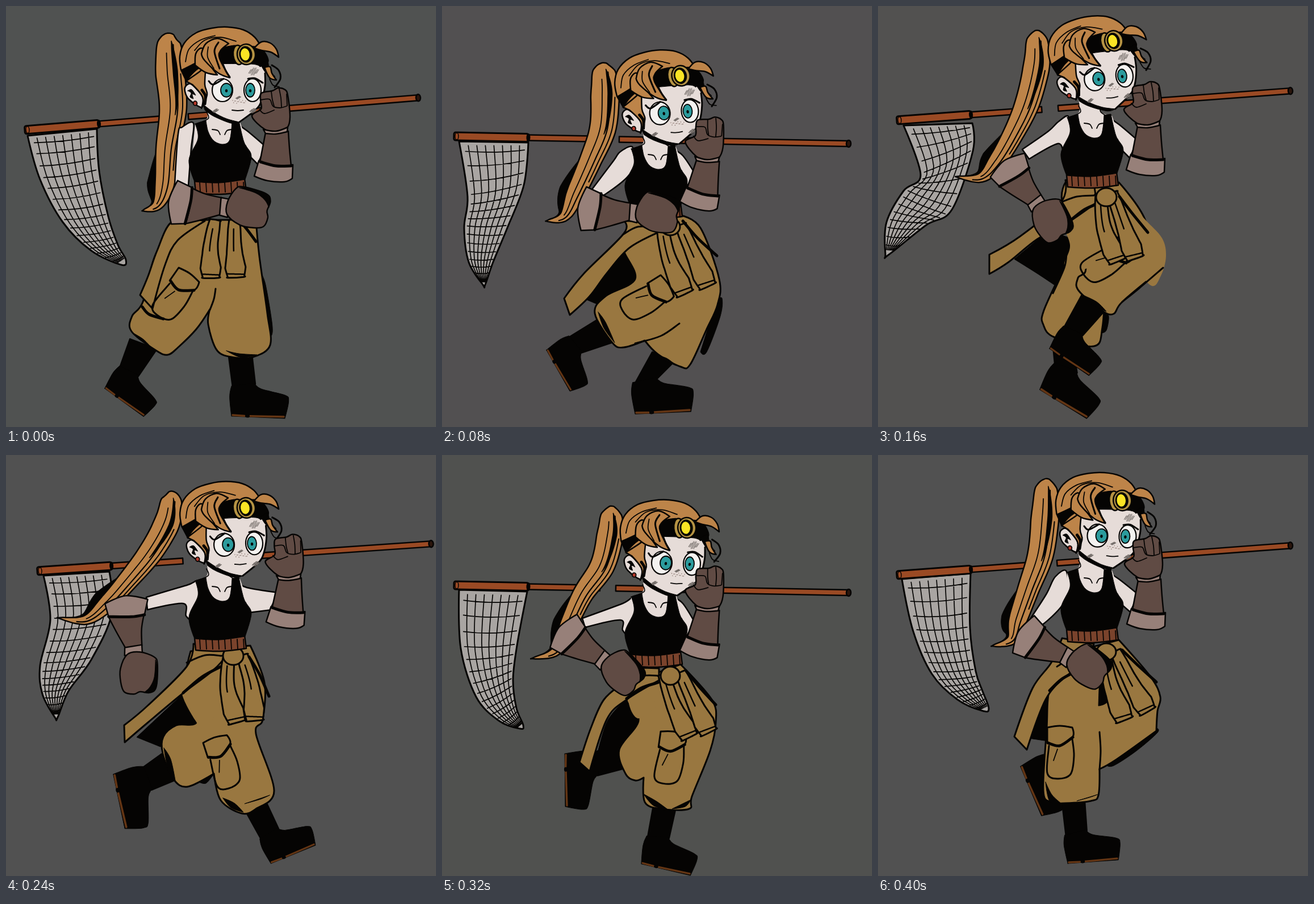
Animation of 757x740 px, one loop 0.48 s. Source, as an HTML page with a canvas:

```html
<!DOCTYPE html>
<html lang="en">
<head>
<meta charset="utf-8">
<title>Walk cycle</title>
<style>
html, body { margin: 0; width: 100%; height: 100%; overflow: hidden; background: #515151; }
canvas { display: block; }
</style>
</head>
<body>
<canvas id="stage" width="757" height="740"></canvas>
<script>
const ctx = document.getElementById('stage').getContext('2d');
const STEP = 80, INK = '#050403', KHAKI = '#997740', HAIR = '#bd8449', SKIN = '#e6dcd8';
const GLOVE = '#604b44', CUFF = '#978079', RUST = '#9a4a24', BELT = '#7a432c', GOLD = '#b59343';
const rad = deg => deg * Math.PI / 180;

// "x y x y! ..." where ! marks a sharp corner
function points(text) {
  const n = text.trim().split(/\s+/), out = [];
  for (let i = 0; i < n.length; i += 2)
    out.push({ x: parseFloat(n[i]), y: parseFloat(n[i + 1]), hard: n[i + 1].endsWith('!') });
  return out;
}

function trace(p, closed) {
  const n = p.length;
  const get = i => closed ? p[(i + n) % n] : p[Math.max(0, Math.min(n - 1, i))];
  ctx.beginPath();
  ctx.moveTo(p[0].x, p[0].y);
  for (let i = 0; i < (closed ? n : n - 1); i++) {
    const a = get(i - 1), b = get(i), c = get(i + 1), d = get(i + 2);
    const k = b.hard ? 0 : 1 / 6, m = c.hard ? 0 : 1 / 6;
    ctx.bezierCurveTo(b.x + (c.x - a.x) * k, b.y + (c.y - a.y) * k,
      c.x - (d.x - b.x) * m, c.y - (d.y - b.y) * m, c.x, c.y);
  }
  if (closed) ctx.closePath();
}

function paint(fill, width) {
  if (fill) { ctx.fillStyle = fill; ctx.fill(); }
  if (width) { ctx.strokeStyle = INK; ctx.lineWidth = width; ctx.stroke(); }
}

const pen = (fill, width) => text => { trace(points(text), !!fill); paint(fill, width); };
const cloth = pen(KHAKI, 3), patch = pen(KHAKI, 0), ink = pen(INK, 1), hair = pen(HAIR, 2.5);
const skin = pen(SKIN, 2.5), bare = pen(SKIN, 0), glove = pen(GLOVE, 2.5), cuff = pen(CUFF, 2.5);
const belt = pen(BELT, 2.5), thin = pen(null, 1.8), line = pen(null, 3), thick = pen(null, 5);

function oval(x, y, rx, ry, fill, width, turn = 0) {
  ctx.beginPath();
  ctx.ellipse(x, y, rx, ry, turn, 0, 7);
  paint(fill, width);
}

function placed(fn, x, y, deg, scale = 1, px = 0, py = 0) {
  ctx.save();
  ctx.translate(x + px, y + py);
  ctx.rotate(rad(deg));
  ctx.scale(scale, scale);
  ctx.translate(-px, -py);
  fn();
  ctx.restore();
}

// smooth position at share u of a point list
function along(p, u) {
  const f = Math.max(0, Math.min(u, .9999)) * (p.length - 1), i = Math.floor(f), t = f - i;
  const q = k => p[Math.max(0, Math.min(p.length - 1, i + k))];
  const mix = k => {
    const a = q(-1)[k], b = q(0)[k], c = q(1)[k], d = q(2)[k];
    return b + t / 2 * (c - a + t * (2 * a - 5 * b + 4 * c - d + t * (3 * (b - c) + d - a)));
  };
  return { x: mix('x'), y: mix('y') };
}

// band of varying half width round a spine; returns its offset edge
function band(spine, widths) {
  const p = points(spine);
  return (side, from = 0, to = 1) => Array.from({ length: 31 }, (_, i) => {
    const v = i / 30, u = from + (to - from) * v;
    const a = along(p, u - .02), b = along(p, u + .02), c = along(p, u);
    const len = Math.hypot(b.x - a.x, b.y - a.y) || 1;
    const f = u * (widths.length - 1), j = Math.min(widths.length - 2, Math.floor(f));
    const w = widths[j] + (widths[j + 1] - widths[j]) * (f - j);
    const k = w * (typeof side === 'function' ? side(v) : side) / len;
    return { x: c.x - (b.y - a.y) * k, y: c.y + (b.x - a.x) * k };
  });
}

function ponytail(spine, size) {
  const edge = band(spine, [3, 21, 26, 24, 20, 17, 9, 0].map(w => w * size));
  trace([...edge(.9, .58, .95), ...edge(v => .9 + Math.sin(v * Math.PI), .58, .95).reverse()], true);
  paint(INK, 1);
  trace([...edge(1), ...edge(-1).reverse()], true);
  paint(HAIR, 2.5);
  const strand = (side, from, to, w) => { trace(edge(side, from, to), false); paint(null, w); };
  strand(.2, .2, .85, 1.8);
  strand(-.35, .15, .9, 2.2);
  strand(-.7, .3, .65, 2);
  trace([...edge(-.2, .12, .45), ...edge(v => -.2 - .3 * Math.sin(v * Math.PI), .12, .45).reverse()], true);
  paint(INK, 1.5);
}

function sleeve(spine) {
  const edge = band(spine, [9, 11, 12, 14, 18, 14]);
  trace([...edge(1), ...edge(-1).reverse()], true);
  paint(KHAKI, 3);
  trace(edge(v => .9 - v * 1.8, .9, .93), false);
  paint(null, 2.5);
  trace(edge(.1, .2, .55), false);
  paint(null, 2.5);
}

function pocket(x, y, deg) {
  placed(() => {
    line('3 32 0 80 18 90 41 82 47 50 44 20');
    cloth('0 0! 22 -3 44 0! 45 16 22 32 0 26!');
    thick('1 27 22 32 45 17');
    thin('18 38 11 58');
  }, x, y, deg);
}

// heel and toe ends of the sole, then the two upper ends of the shaft
function boot(hx, hy, tx, ty, ax, ay, bx, by) {
  const turn = Math.atan2(ty - hy, tx - hx), size = Math.hypot(tx - hx, ty - hy) / 92;
  const c = Math.cos(turn) * size, s = Math.sin(turn) * size;
  const at = (x, y) => [hx + x * c - y * s, hy + x * s + y * c];
  ctx.beginPath();
  [at(0, -48), [ax, ay], [bx, by], at(40, -56)].forEach(q => ctx.lineTo(...q));
  ctx.closePath();
  paint(INK, 2);
  placed(() => {
    ink('-1 1! -5 -33 -2 -52! 38 -58! 50 -48 92 -38 99 -28 93 3!');
    ctx.strokeStyle = '#633514';
    ctx.lineWidth = 3.5;
    ctx.beginPath();
    ctx.moveTo(1, -1); ctx.lineTo(22, 0); ctx.moveTo(31, 0); ctx.lineTo(91, 0);
    ctx.stroke();
    oval(27, 0, 4, 3, INK, 0);
  }, hx, hy, turn * 180 / Math.PI, size);
}

function pole(x, y, rise, gapA, gapB) {
  placed(() => {
    ctx.beginPath();
    ctx.rect(130, -5, gapA - x - 130, 10);
    paint(RUST, 2.5);
    ctx.beginPath();
    ctx.rect(gapB - x, -5, 696 - gapB + x, 10);
    paint(RUST, 2.5);
    oval(695, 0, 4, 6, '#2a150c', 2.5);
    ctx.beginPath();
    ctx.roundRect(0, -7, 131, 14, 3);
    paint(RUST, 3);
    oval(5, 0, 3, 6, null, 1.5);
    oval(131, 0, 3, 7, INK, 1);
  }, x, y, Math.atan2(rise, 696) * 180 / Math.PI);
}

function net(left, right) {
  const L = points(left), R = points(right);
  const at = (u, v) => {
    const a = along(L, u), b = along(R, u);
    return [a.x + (b.x - a.x) * v, a.y + (b.y - a.y) * v];
  };
  trace([...L, ...[...R].reverse()], true);
  paint('#a9a5a2', 3);
  ctx.lineWidth = 1.7;
  ctx.beginPath();
  for (let c = 1; c < 8; c++)
    for (let i = 0; i < 24; i++) ctx[i ? 'lineTo' : 'moveTo'](...at(.03 + i * .04, c / 8));
  for (let r = 1; r < 16; r++) {
    ctx.moveTo(...at(r / 16.5, .07));
    ctx.quadraticCurveTo(...at(r / 16.5 + .015, .5), ...at(r / 16.5, .95));
  }
  ctx.stroke();
}

function torso() {
  bare('352 160! 354 186 333 197! 328 250! 410 250! 425 230! 412 193! 393 186 392 165!');
  thin('353 175 356 187 335 196');
  thin('391 178 392 186 400 192');
  thin('363 206 373 208 377 215');
  thin('385 215 389 208 397 206');
  belt('332 297! 420 292! 423 315! 378 320 334 318!');
  for (let x = 341; x < 420; x += 11) thin(`${x} 299 ${x + 1} 316`);
  ink('333 196! 352 190! 356 210 366 226 382 232 394 224 398 192! 410 190! 419 228 431 248 430 265 421 294! 375 300 332 298! 322 260 338 222');
}

function rearGlove() {
  cuff('-5 -40! -19 -2 -12 37! 12 35! 20 5 21 -29!');
  glove('21 -28! 45 -19 74 -14! 73 16! 40 27 13 35! 19 5');
  thick('21 -29 20 -5 12 35');
  cuff('73 -14! 88 -12! 86 20! 72 17!');
  glove('85 -8 98 -31 112 -35 152 -25 160 -12 155 5 157 17 150 33 132 36 108 32 85 15');
  ink('104 -33! 122 -33 150 -26 160 -14! 158 -1! 150 -14 134 -25');
}

function frontGlove() {
  cuff('445 272! 475 281 505 279! 504 303! 490 309 460 307 437 299!');
  glove('457 222! 497 220! 499 250 502 281! 475 281 447 274!');
  thick('448 274 475 281 502 281');
  glove('450 153 469 149 479 144 491 147 496 157 500 195 495 214 478 221 456 217 433 194 449 181 448 165');
  thin('449 165 464 164 470 176 482 179 494 176');
  thin('467 150 469 165 472 176');
  thin('481 146 484 162 485 178');
  thin('494 155 495 175');
  thin('446 182 455 189 472 183');
  cuff('453 217! 475 220 496 213! 495 221! 475 225 457 224!');
}

function smudge(x, y, r) {
  ctx.strokeStyle = '#77706c';
  ctx.lineWidth = 1.2;
  ctx.beginPath();
  for (let i = -3; i < 4; i++) {
    const h = r * (1 - Math.abs(i) / 5) * (i % 2 ? 1 : .75);
    ctx.moveTo(x + i * r / 3.5 - 2, y + h);
    ctx.lineTo(x + i * r / 3.5 + 2, y - h);
  }
  ctx.stroke();
}

function eye(x, rx, ix, irx) {
  oval(x, 148, rx, 20, '#f4f2f0', 2.2);
  oval(ix, 148, irx, 12, '#2b9b9d', 1.8);
  oval(ix, 149, 2.2, 2.8, INK, 0);
}

function face() {
  bare('350 108! 385 98 440 98 455 106 457 130 453 156 443 178 411 204 388 199 347 174 345 150');
  line('456 118 456 140 450 166 440 182 411 204');
  ink('347 173! 366 187 388 198 411 204! 396 206 366 194 350 183!');
  skin('344 178 322 164 315 150 317 140 327 138 346 160');
  ink('320 149! 327 147 334 157! 328 155 330 163! 324 160 326 153');
}

function headlamp() {
  ink('309 112! 340 96 372 76 402 69! 440 71! 455 80 462 98 447 107! 430 102 350 105 318 133!');
  oval(409, 86, 9, 17, GOLD, 2.5, -.12);
  oval(423, 85, 16, 18, GOLD, 2.5, -.12);
  oval(422, 85, 11.5, 14.5, INK, 0, -.12);
  oval(421, 85, 7.8, 10.8, '#fae424', 0, -.12);
}

function fringe() {
  hair('333 104! 334 84 343 74 352 80 354 96 372 121! 352 117');
  hair('344 84! 352 66 372 57 392 66! 378 78 376 92 394 126! 374 118 350 96');
  thin('356 72 355 90 366 110');
  line('374 64 367 80 376 110');
  line('381 100 387 114 394 125');
  hair('437 74! 450 63 465 65 476 76 480 90! 466 81 450 78');
  ink('448 102! 460 96 464 112 474 124! 458 118');
  hair('455 108! 465 107 468 118 476 130! 464 126');
  line('468 104 480 113 483 128 473 143');
  thin('464 128 470 139 481 142');
}

function head() {
  hair('308 112! 306 88 314 65 335 47 362 39 390 37 418 42 438 55 450 74! 452 100! 400 100 355 112 318 133!');
  thin('316 98 322 76 342 60 368 52');
  thin('332 78 350 60 378 55 405 62');
  face();
  hair('317 132! 340 116 352 106! 350 138 354 156 344 180! 346 160 328 138!');
  thick('345 148 351 158 350 172');
  headlamp();
  fringe();
  eye(381, 18, 388, 10);
  eye(434, 15, 430, 8);
  line('357 132 365 138 383 128');
  line('426 128 438 127 452 135');
  thin('398 183 408 184 418 183');
  smudge(436, 115, 8);
  smudge(369, 184, 4);
  smudge(435, 184, 5);
  smudge(409, 161, 3);
  for (let i = 0; i < 15; i++) oval(399 + i * 1.75, 166 + i * 5 % 7 - i % 3, .8, .8, '#8b7770', 0);
  oval(333, 171, 3.4, 3.8, '#b4382a', 1.8);
}

// upper arm that links the shoulder with the raised glove
function raisedArm(drop, dx, dy, deg) {
  const c = Math.cos(rad(deg)), s = Math.sin(rad(deg));
  const at = (u, v) => `${497 + dx + u * c - v * s} ${215 + dy + u * s + v * c}!`;
  skin(`408 ${198 + drop}! 424 ${208 + drop} ${at(-40, 32)} ${at(-54, 63)} 428 ${252 + drop}!`);
}

const setTorso = y => placed(torso, 0, y, 0);
const setHead = (x, y, deg) => placed(head, x, y, deg, 1, 409, 147.5);
const setFist = (x, y, deg) => placed(frontGlove, x, y, deg, 1, 497, 215);
const setRear = (x, y, deg, size) => placed(rearGlove, x, y, deg, size);

function contact() {
  net('38 228! 60 305 100 380 150 430 203 455', '160 216! 164 290 180 370 197 420 211 446');
  pole(33, 218, -57, 290, 322);
  ponytail('292 49 287 66 289 115 294 180 284 250 279 315 266 350 240 360', 1);
  boot(175, 672, 243, 719, 218, 585, 266, 603);
  boot(398, 720, 490, 722, 391, 610, 433, 610);
  ink('449 470! 457 490 468 555 468 578 460 580!');
  cloth('300 376! 262 440 241 520 222 545 221 572 265 606 285 613 303 600 335 568 359 533! 356 560 372 606 403 618 435 617 465 596 460 540 446 440 440 376!');
  line('369 497 366 515 359 534');
  cloth('330 374! 290 381 266 430 250 475 236 508! 258 532! 280 455 302 412 350 378!');
  thick('240 529 252 542 277 550');
  ink('222 574! 242 586 260 605!');
  ink('388 606! 410 611 442 613! 415 618');
  pocket(304, 460, 35);
  sleeve('368 376 360 425 361 478');
  sleeve('402 376 402 425 405 477');
  thick('412 378 426 395 440 414');
  raisedArm(11, 0, 0, 0);
  skin('330 206 310 213 303 225 297 314! 321 316! 326 250');
  setTorso(11);
  setRear(305, 347, 3, 1);
  setHead(0, 0, 0);
  setFist(0, 0, 0);
}

function dip() {
  net('30 238! 45 335 39 390 47 450 72 490', '152 240! 144 315 115 390 90 450 76 490');
  pole(21, 229, 13, 290, 312);
  ponytail('286 100 285 115 287 155 283 215 262 270 235 330 215 370 183 378', .97);
  boot(185, 605, 227, 675, 275, 550, 299, 592);
  boot(341, 716, 437, 710, 370, 608, 412, 622);
  ink('484 516! 493 514 490 545 466 608 455 608!');
  ink('322 425! 295 455 254 516! 280 527! 350 478!');
  cloth('320 400! 320 430 340 480 288 510 269 540 300 592 320 600 357 588! 380 612 420 634 437 630 465 570 485 525 488 480 455 390 420 368! 380 372');
  line('340 593 385 580 418 558');
  pocket(385, 473, 58);
  ink('275 538! 288 556 304 592! 285 566');
  ink('370 612! 395 619 412 632! 388 622');
  cloth('320 378! 320 400 250 470 215 514! 225 543! 260 510 290 470 330 425 385 396! 372 378!');
  line('318 402 345 388 380 390');
  sleeve('387 385 400 445 428 506');
  sleeve('420 385 442 435 468 493');
  oval(402, 388, 17, 15, KHAKI, 3);
  thick('424 378 450 408 484 439');
  raisedArm(55, -8, 53, 7.5);
  skin('336 249 314 256 302 272 262 325! 278 337! 330 296');
  setTorso(55);
  setRear(258, 358, 2, 1);
  setHead(2.5, 38.5, -4.5);
  setFist(-8, 53, 7.5);
}

function passing() {
  net('45 210! 75 297 45 325 15 380 13 436', '166 206! 167 255 130 358 85 385 19 437');
  pole(33, 201, -52, 289, 318);
  ponytail('280 43 280 60 279 105 263 170 238 225 208 275 180 302 137 300', .9);
  ink('396 538! 406 545 402 570 392 575!');
  cloth('325 370! 338 420 328 455 292 535 291 560 310 582 380 598 395 565 400 480!');
  boot(286, 674, 368, 722, 308, 600, 345, 610);
  boot(303, 602, 372, 647, 360, 505, 400, 535);
  ink('300 395! 240 445! 280 470 313 492! 345 410!');
  cloth('330 310! 325 350 365 455 352 478 353 500 395 536 415 541 430 520 490 470! 470 375 424 310!');
  patch('332 322! 322 372 338 420 328 455 345 468 385 440 385 330!');
  patch('440 340! 470 375 500 408 507 440 498 474 480 491 440 440!');
  line('430 520 460 496 502 460');
  line('332 435 328 460 308 505');
  pocket(425, 405, 55);
  ink('358 507! 385 520 402 537! 378 526');
  cloth('330 306! 322 345 250 405 196 437! 196 471! 230 450 280 410 335 380 385 345! 380 312!');
  line('322 345 350 335 380 333');
  thick('335 380 360 360 380 350');
  sleeve('392 330 398 390 422 449');
  sleeve('412 328 432 385 453 444');
  oval(402, 336, 18, 16, KHAKI, 3);
  thick('425 335 448 365 475 398');
  raisedArm(0, 0, -11, 0);
  skin('336 196 318 203 300 220 254 252! 266 269! 316 242 328 254');
  setTorso(0);
  setRear(232, 287, 50, .95);
  setHead(0, -22.5, -7);
  setFist(0, -11, 0);
}

function reach() {
  net('66 212! 78 290 60 370 64 420 86 461', '182 205! 186 280 150 360 110 415 91 461');
  pole(55, 204, -48, 312, 440);
  ponytail('290 64 291 80 283 120 255 170 215 220 177 262 140 290 91 286', .88);
  boot(190, 562, 212, 655, 274, 525, 302, 570);
  boot(467, 717, 543, 684, 418, 620, 455, 603);
  ink('338 574! 352 577 366 560! 350 560!');
  ink('320 412! 230 496! 272 513! 337 470!');
  cloth('325 345! 315 405 336 468 300 475 277 495 276 525 295 570 320 583 366 560! 378 607 415 630 440 622 472 590 440 490 452 465 455 400 430 335!');
  patch('320 395! 310 420 333 466 350 480 380 440!');
  ink('278 515! 290 535 298 572! 285 550');
  ink('382 603! 402 612 418 628! 396 620');
  ink('464 598! 448 605 420 613!');
  pocket(347, 506, -18);
  cloth('330 332! 318 372 250 440 208 475! 209 505! 250 470 310 420 365 378 390 350! 385 334!');
  line('318 365 350 352 380 353');
  thick('312 418 345 390 380 371');
  sleeve('392 352 390 410 407 470');
  sleeve('416 352 432 405 438 467');
  oval(400, 353, 18, 16, KHAKI, 3);
  thick('428 355 446 385 463 424');
  raisedArm(25, 23, -4, 1.5);
  skin('340 224 318 229 247 250! 249 272! 312 261 317 283 330 285');
  setTorso(25);
  setRear(212, 266, 79, .98);
  setHead(3, 8.5, -2.8);
  setFist(23, -4, 1.5);
}

function land() {
  net('30 237! 33 340 60 425 100 467 137 481', '150 240! 132 335 125 395 131 445 143 475');
  pole(21, 229, 13, 278, 306);
  ponytail('299 90 298 106 296 140 282 195 248 245 222 300 200 345 157 358', .9);
  boot(217, 526, 220, 617, 300, 508, 326, 550);
  boot(352, 718, 437, 736, 372, 615, 412, 620);
  ink('325 430! 290 470 266 557! 325 550! 348 465!');
  cloth('345 395! 325 430 346 467 312 518 323 560 340 572 355 567! 357 610 385 622 435 622 440 600 472 520 482 470 475 430 420 368!');
  patch('340 390! 328 430 345 463 380 440!');
  ink('355 596! 378 609 400 625! 372 616');
  ink('438 606! 428 618 405 622!');
  pocket(385, 486, 8);
  cloth('355 374! 320 400 285 430 262 480 242 540! 260 556! 290 465 325 430 382 396! 382 375!');
  line('330 400 355 388 382 388');
  thick('325 428 350 410 380 400');
  sleeve('390 385 408 440 436 496');
  sleeve('420 382 444 435 470 488');
  oval(402, 388, 17, 16, KHAKI, 3);
  thick('430 380 455 410 482 439');
  raisedArm(53, -8, 53, 7.5);
  skin('340 251 318 261 247 287! 252 303! 314 290 318 308 330 312');
  setTorso(53);
  setRear(220, 315, 34, .97);
  setHead(6, 42.5, 2);
  setFist(-8, 53, 7.5);
}

function rise() {
  net('42 218! 62 310 95 385 140 430 185 450', '163 208! 162 305 172 380 184 415 195 445');
  pole(33, 211, -52, 290, 316);
  ponytail('298 42 296 60 294 110 286 175 265 235 246 290 235 325 200 336', .95);
  boot(252, 548, 290, 632, 300, 532, 318, 590);
  boot(335, 717, 422, 709, 323, 605, 364, 605);
  ink('302 415! 280 460 266 498! 300 503!');
  ink('490 480! 492 488 455 520 415 546 402 545!');
  cloth('330 350! 302 410 297 480 291 590 305 610 330 612 375 608 388 598 390 552! 420 535 490 485! 492 450 497 425 480 390 424 325!');
  line('390 487 392 520 390 553');
  ink('295 575! 306 597 322 612! 302 608');
  ink('386 597! 372 602 350 608!');
  pocket(298, 479, 0);
  cloth('324 322! 305 365 272 410 240 495! 262 518! 295 430 330 390 372 362! 380 332!');
  line('315 372 335 360 355 352');
  thick('302 414 322 395 345 382');
  ink('390 385! 405 430 388 441!');
  sleeve('398 345 410 405 434 466');
  sleeve('418 345 446 400 475 451');
  oval(402, 346, 17, 15, KHAKI, 3);
  thick('430 343 460 372 490 399');
  raisedArm(10, 1, -2, 0);
  skin('332 205 312 214 296 245 268 288! 290 298! 328 258');
  setTorso(10);
  setRear(263, 320, 25, .98);
  setHead(5.5, -5.5, 1.6);
  setFist(1, -2, 0);
}

const steps = [contact, dip, passing, reach, land, rise];
const tones = ['#505251', '#525051', '#525150', '#515151', '#50514f', '#515151'];

let shown = -1;
function tick() {
  const now = Math.floor(performance.now() / STEP) % steps.length;
  if (now !== shown) {
    shown = now;
    ctx.fillStyle = tones[now];
    ctx.fillRect(0, 0, 757, 740);
    ctx.lineJoin = ctx.lineCap = 'round';
    steps[now]();
  }
  requestAnimationFrame(tick);
}
tick();
</script>
</body>
</html>
```
